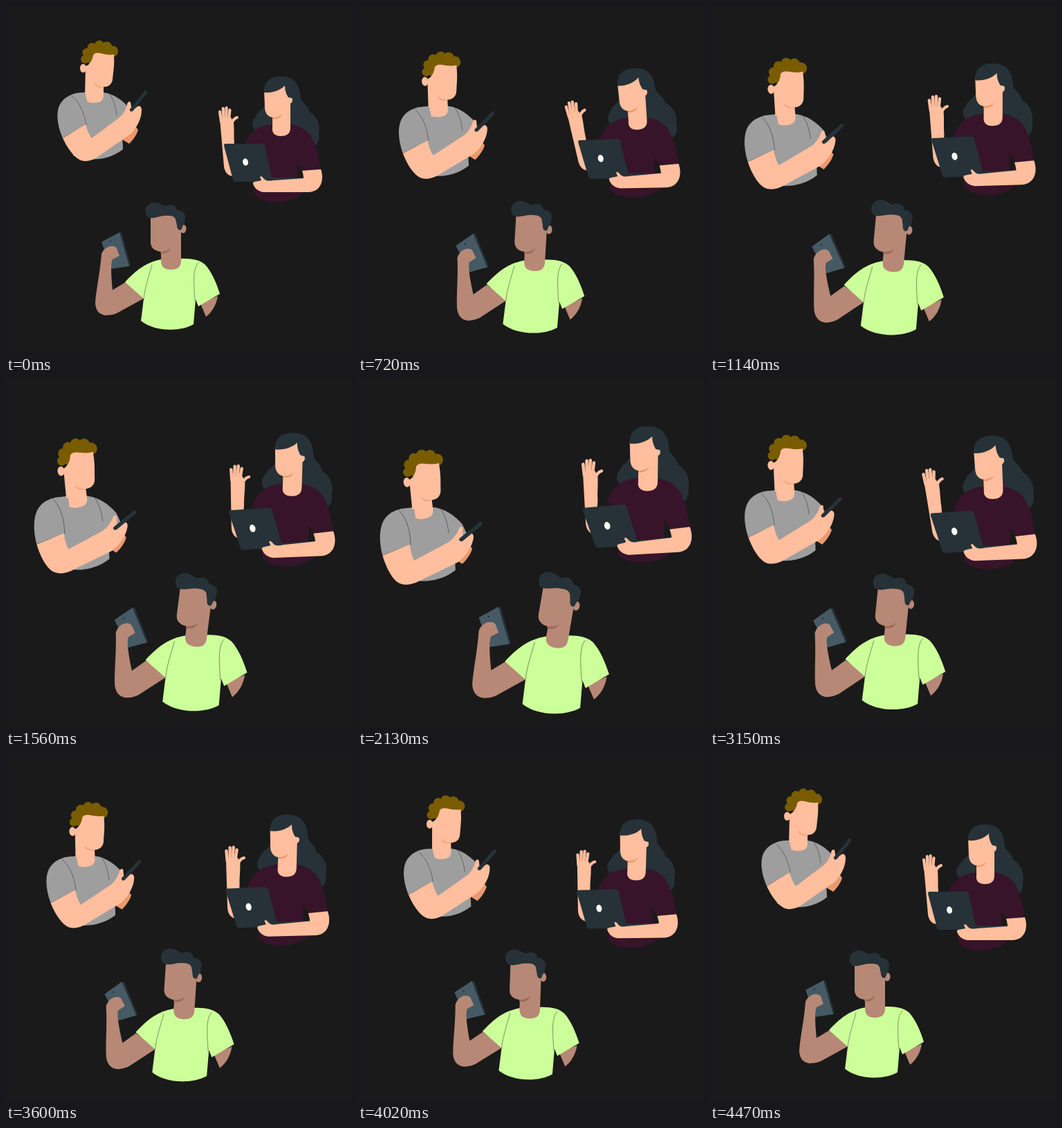
An HTML page with a canvas for the animation above (4530 ms loop, 500 by 500 pixels).

```html
<!DOCTYPE html>
<html lang="en">
<head>
<meta charset="utf-8">
<title>Three people with devices</title>
<style>
  html, body { margin: 0; width: 100%; height: 100%; overflow: hidden; background: #1a1a1a; }
  canvas { display: block; }
</style>
</head>
<body>
<canvas id="stage" width="500" height="500"></canvas>
<script>
const ctx = document.getElementById('stage').getContext('2d');
const LOOP = 4530, STEP = 30, LAST = 4470, TURNING = 2160;
const SKIN = '#ffbe9d', SHADE = '#eb996e', BROWN = '#b78876', BROWN_SHADE = '#9a6a58';
const INK = '#263238', GREY = '#9e9e9e', CURLS = '#7a5c00', PLUM = '#37142a', LIME = '#ccff99';

const rad = deg => deg * Math.PI / 180;

// Rises from 0 to 1 at the peak, then falls back to 0 at the end of the loop.
const tent = (t, peak) => Math.min(t / peak, (LAST - t) / (LAST - peak));

// Draws around a fixed point that is moved, scaled and turned.
function around(x, y, { dx = 0, dy = 0, size = 1, turn = 0 }, draw) {
  ctx.save();
  ctx.translate(x + dx, y + dy);
  ctx.rotate(rad(turn));
  ctx.scale(size, size);
  ctx.translate(-x, -y);
  draw();
  ctx.restore();
}

const joint = (x, y, turn, draw) => around(x, y, { turn }, draw);

function fill(color, path) {
  ctx.fillStyle = color;
  ctx.fill(new Path2D(path));
}

function line(color, width, path) {
  ctx.strokeStyle = color;
  ctx.lineWidth = width;
  ctx.lineCap = 'round';
  ctx.stroke(new Path2D(path));
}

function oval(color, x, y, rx, ry = rx, tilt = 0) {
  ctx.fillStyle = color;
  ctx.beginPath();
  ctx.ellipse(x, y, rx, ry, rad(tilt), 0, 2 * Math.PI);
  ctx.fill();
}

function curls() {
  for (let i = 0; i < 6; i++) {
    const a = rad(180 + 29 * i);
    oval(CURLS, 136 + 22 * Math.cos(a), 77 + 20 * Math.sin(a), 6 + .4 * i);
  }
  oval(CURLS, 133, 72, 20, 14);
}

function phoneMan(lean) {
  fill(SHADE, 'M168 193 L178 199 C184 193 189 186 191 179 L184 170 L170 178Z');
  fill(GREY, 'M114 125 L97 127 L92 170 L98 190 L97 216 C115 223 145 226 169 207 L168 186 L184 160 L178 147 C168 136 156 127 141 125Z');
  line(INK, .5, 'M150 127 C156 137 159 147 160 158');

  joint(127, 140, -8 * lean, () => {
    oval(SKIN, 111.5, 90, 4.5, 6.2);
    curls();
    fill(SKIN, 'M114 130 L115 87 C121 85 125 78 126 71 C131 63 143 73 156 70 C157 86 155 95 154 106 C153 114 147 117 141 117 L141 129 C141 137 136 140 127 140 C118 140 114 137 114 130Z');
    fill(SHADE, 'M127 110 C130 115 135 117 142 117 C135 119 128 116 127 110Z');
  });

  joint(97, 135, 10 * lean, () => {
    fill(GREY, 'M114 125 C98 124 84 131 78 142 C71 155 75 175 82 191 L115 171 L118 140Z');
    line(INK, .5, 'M95 130 C107 139 113 155 116 171 L82 191');
    fill(SKIN, 'M82 191 C88 204 97 217 106 222 C113 226 123 224 131 219 L180 185 C190 175 196 162 196 150 C196 145 192 143 189 146 L182 151 L180 139 C178 137 175 139 175 143 C173 150 169 157 164 161 L124 191 C120 186 117 179 115 171Z');
  });

  joint(97, 135, 13.5 * lean, () =>
    fill(INK, 'M179 149 L200 123 C202 121 205 122 204 126 L184 151 C181 154 178 152 179 149Z'));
}

function wavingArm() {
  fill(SKIN, 'M309 163 L325 161 L329 168 C330 180 329 190 330 200 L329 246 C321 246 316 240 315 232Z');
  for (let i = 0; i < 4; i++)
    line(SKIN, 4.2, `M${311 + 3.6 * i} 167 L${309 + 4.8 * i} ${147 + 2 * (i - 1.7) ** 2}`);
  line(SKIN, 4, 'M325 171 C328 165 330 162 334 161');
}

function laptopWoman(lean, t) {
  const s = Math.sin(4 * Math.PI * t / LAST);
  const swing = -s * (.75 + .3 * s);
  const head = draw => joint(397, 188, 4 * swing, draw);

  head(() => fill(INK, 'M374 124 C372 104 390 101 402 102 C419 103 425 117 426 134 C428 140 438 145 438 153 C448 157 455 172 452 184 C454 194 449 203 442 203 C420 206 390 190 363 181 C355 177 354 166 361 160 C364 150 373 152 374 140Z'));
  joint(325, 240, 9 * swing, wavingArm);
  joint(397, 188, lean, () =>
    fill(PLUM, 'M385 171 C362 173 350 184 343 204 L360 210 L359 272 C370 288 412 287 430 270 L421 250 L421 227 L429 238 L455 236 C452 215 446 196 440 187 C432 176 420 172 410 171Z'));

  head(() => {
    oval(SKIN, 410, 136, 4, 5);
    fill(SKIN, 'M373 122 L404 112 L411 130 L411 176 C411 185 405 188 397 188 C388 188 384 183 385 176 L385 161 C378 160 374 154 374 146Z');
    fill(SHADE, 'M385 161 C391 161 396 159 399 156 C398 161 391 164 385 163Z');
    fill(INK, 'M373 125 C372 107 385 101 400 102 C415 103 416 122 413 133 L408 132 C404 126 403 120 403 115 C396 122 385 126 373 125Z');
  });

  joint(450, 255, -5.5 * lean, () => {
    fill(INK, 'M317 199 L370 199 Q373 199 374 202 L384 248 L430 248 L428 251 L384 254 L331 254 Q329 254 328 251 L315 202 Q315 199 317 199Z');
    oval('#fffdf5', 346, 225.5, 3.9, 5.2, -12);
  });
  joint(450, 255, -3.5 * lean, () =>
    fill(SKIN, 'M357 257 C356 253 362 254 369 252 L367 247 C369 244 371 248 373 250 C376 253 380 253 386 252 L430 249 C430 245 429 242 428 238 L455 236 C460 250 456 268 438 269 L372 269 C364 268 359 263 357 257Z'));
}

function tabletAndHand() {
  fill(INK, 'M163 328 L167 327 L180 375 L176 377Z');
  fill('#455a64', 'M138 341 L164 327 L178 376 L152 380Z');
  oval(INK, 151, 340, 1.2);
  fill(BROWN, 'M129 428 C131 405 136 385 138 358 C141 351 147 347 153 347 C158 347 161 350 161 353 L164 361 L154 366 C151 372 152 390 154 411 L158 432 L146 447 C136 447 129 441 129 428Z');
}

function tabletMan(lean) {
  const bend = Math.sin(Math.PI * lean);

  fill(BROWN, 'M281 430 L289 449 C298 442 304 432 306 419Z');
  joint(190, 405, -5 * bend, () => {
    fill(BROWN, 'M173 399 L153 411 L140 446 C148 448 155 446 160 444 L200 422Z');
    joint(142, 432, -3 * bend, tabletAndHand);
  });

  fill(LIME, 'M226 366 C202 370 188 382 172 399 L199 423 L195 455 C215 471 252 471 271 460 L274 424 L278 434 L309 416 C304 400 297 384 288 374 C278 365 265 365 253 365Z');
  line(INK, .5, 'M211 374 C207 389 201 405 199 423 M278 371 C270 379 271 398 273 426');

  joint(238, 381, 10 * lean, () => {
    oval(BROWN, 256, 322, 4.5, 6.2);
    fill(BROWN, 'M209 300 L250 300 L253 318 L253 368 C253 377 248 381 238 381 C229 381 224 377 224 368 L224 355 C214 354 209 349 209 341Z');
    fill(BROWN_SHADE, 'M223 355 C230 355 235 353 238 349 C237 355 231 359 223 357Z');
    fill(INK, 'M205 305 C198 296 202 286 213 284 C223 284 226 289 231 289 C238 285 246 288 247 295 C255 294 262 302 258 309 C260 314 255 316 254 322 C252 326 247 323 247 317 L245 308 C242 302 236 303 230 303 C222 303 212 309 205 305Z');
  });
}

function draw() {
  const t = Math.min(Math.floor(performance.now() % LOOP / STEP) * STEP, LAST);
  const move = tent(t, TURNING);

  // Each figure drifts along a line while it grows and leans at its own pace.
  const figure = (x, y, dx, dy, grow, peak, paint) => {
    const lean = tent(t, peak);
    around(x, y, { dx: dx * move, dy: dy * move, size: 1 + grow * lean }, () => paint(lean, t));
  };

  ctx.fillStyle = '#1a1a1a';
  ctx.fillRect(0, 0, 500, 500);
  figure(127, 140, -33, 61.5, .12, 1800, phoneMan);
  figure(397, 188, 21, -28, .095, 2430, laptopWoman);
  figure(238, 381, 47.5, 6, .1, TURNING, tabletMan);
  requestAnimationFrame(draw);
}
draw();
</script>
</body>
</html>
```
